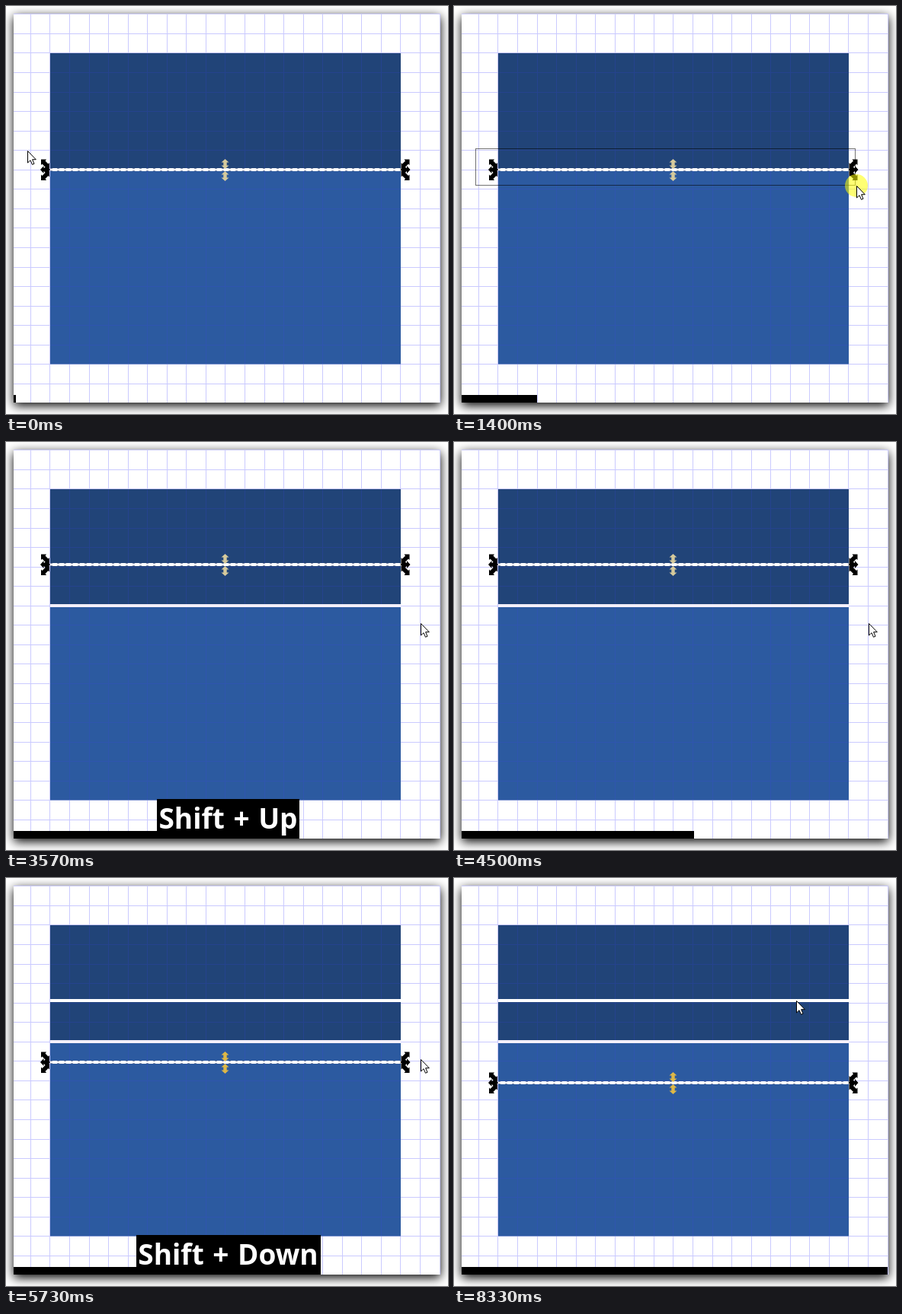
Animation, 580 px wide and 536 px high, one loop 8400 ms. Source, as an HTML page:

```html
<!DOCTYPE html>
<html lang="en">
<head>
<meta charset="utf-8">
<title>Duplicate and move a line</title>
<style>
  html, body { margin: 0; width: 100%; height: 100%; overflow: hidden; background: #fff; }
  svg { display: block; width: 580px; height: 536px; }
  text { font: 700 37px "Open Sans", "Noto Sans", sans-serif; word-spacing: 2px; fill: #fff; text-anchor: middle; }
</style>
</head>
<body>
<svg viewBox="0 0 580 536">
  <defs>
    <filter id="soft" x="-10%" y="-10%" width="120%" height="120%"><feGaussianBlur stdDeviation="7"/></filter>
    <clipPath id="blue"><rect x="59" y="63" width="458" height="407"/></clipPath>
    <path id="grid" stroke="#3f3fff"/>
    <path id="diag" d="M-5.5-6H1.5L0-4 4 0 5.5-1.5V6H-1.5L0 4-4 0-5.5 1.5Z"/>
    <path id="vert" d="M0-6.5L5-2H2.2V2H5L0 6.5-5 2H-2.2V-2H-5Z"/>
  </defs>
  <rect x="10" y="14" width="560" height="511" filter="url(#soft)"/>
  <rect x="10" y="10" width="560" height="511" fill="#fff"/>
  <use href="#grid" opacity=".27"/>
  <rect x="58" y="62" width="460" height="153" fill="#214478"/>
  <rect x="58" y="215" width="460" height="255.5" fill="#2c5aa0"/>
  <use href="#grid" opacity=".16" clip-path="url(#blue)"/>
  <rect x="58" y="213" width="460" height="4" fill="#f4f0fa"/>
  <rect id="copy" x="58" y="159" width="460" height="4" fill="#fff"/>
  <g id="sel">
    <rect x="58" y="-2" width="460" height="4" fill="#fff"/>
    <path d="M58-1.5H518M58 1.5H518" stroke="#3b4a76" stroke-dasharray="3 6" opacity=".6"/>
    <g id="side">
      <use href="#diag" x="51.5" y="-7.5"/>
      <use href="#vert" transform="translate(51.5 0) rotate(90)"/>
      <use href="#diag" transform="translate(51.5 8) scale(1 -1)"/>
    </g>
    <use href="#side" transform="translate(575.5 0) scale(-1 1)"/>
    <g id="mid">
      <use href="#vert" x="287.5" y="-7.5"/>
      <use href="#vert" x="287.5" y="8.5"/>
    </g>
  </g>
  <rect id="band" x="28.5" y="187.5" fill="none" stroke="#000" stroke-opacity=".55"/>
  <g id="pointer">
    <circle id="press" r="15" fill="#ff0" fill-opacity=".55"/>
    <path d="M.5.5V16L4 12.7 6.5 18.3 9 17.2 6.6 11.7H11.3Z" fill="#fff" stroke="#000"/>
  </g>
  <rect id="bar" x="10" y="511" height="10"/>
  <g id="label">
    <rect id="box" y="469" height="52"/>
    <text id="keys" x="291.5" y="508"></text>
  </g>
</svg>
<script>
const LOOP = 8400, TICK = 103.5, LEAD = 62, STEP = 27;
const UPS = [3050, 3570], COPIED = 4610, DOWNS = [4910, 5310, 5730, 6160];
const LABELS = [
  { from: 2640, to: 3570, text: "Ctrl + D", width: 148 },
  { from: 3570, to: 4500, text: "Shift + Up", width: 187 },
  { from: COPIED, to: 5010, text: "Ctrl + D", width: 148 },
  { from: 5010, to: 5530, text: "Shift + Down", width: 242 },
  { from: 5730, to: 6910, text: "Shift + Down", width: 242 }
];
const HOME = [28, 190], PARK = [544, 238], EXIT = [449, 161];

const $ = id => document.getElementById(id);
const set = (id, attrs) => { for (const k in attrs) $(id).setAttribute(k, attrs[k]); };
const show = (id, on) => set(id, { visibility: on ? "visible" : "hidden" });
const phase = (t, from, length) => Math.min(1, Math.max(0, (t - from) / length));
const mix = (a, b, k) => a.map((v, i) => Math.round(v + (b[i] - v) * k));
const passed = (times, t) => times.filter(at => t >= at).length;

function drawGrid() {
  const pitch = 25.56;
  let d = "";
  for (let i = 0; i < 22; i++) d += `M${Math.floor(32.34 + i * pitch) + .5} 10V521`;
  for (let i = 0; i < 20; i++) d += `M10 ${Math.floor(10.79 + i * pitch) + .5}H570`;
  set("grid", { d });
}

function pointerAt(t) {
  const drag = 1 - (1 - phase(t, 280, 1210)) ** 1.4;
  const k = phase(t, 7010, 700);
  return k ? mix(PARK, EXIT, k * k * (3 - 2 * k)) : mix(HOME, PARK, drag);
}

function render(t) {
  const n = Math.floor((t + LEAD) / TICK);
  const [x, y] = pointerAt(n * TICK - LEAD);
  const pressed = t >= 170 && t < 1600;
  set("pointer", { transform: `translate(${x} ${y})` });
  show("press", pressed);
  show("band", pressed && x > 30);
  set("band", { width: Math.max(0, x - 30), height: Math.max(0, y - 188) });

  const down = passed(DOWNS, t);
  set("sel", { transform: `translate(0 ${215 + STEP * (down - passed(UPS, t))})` });
  set("mid", { fill: down ? "#deb846" : "#d6ca9c" });
  show("copy", t >= COPIED);

  set("bar", { width: Math.round(3 + 6.86 * n) });
  const label = LABELS.find(l => t >= l.from && t < l.to);
  show("label", label);
  if (label) {
    set("box", { x: Math.round(291.5 - label.width / 2), width: label.width });
    $("keys").textContent = label.text;
  }
}

drawGrid();
const start = performance.now();
function loop() {
  render((performance.now() - start) % LOOP);
  requestAnimationFrame(loop);
}
loop();
</script>
</body>
</html>
```
